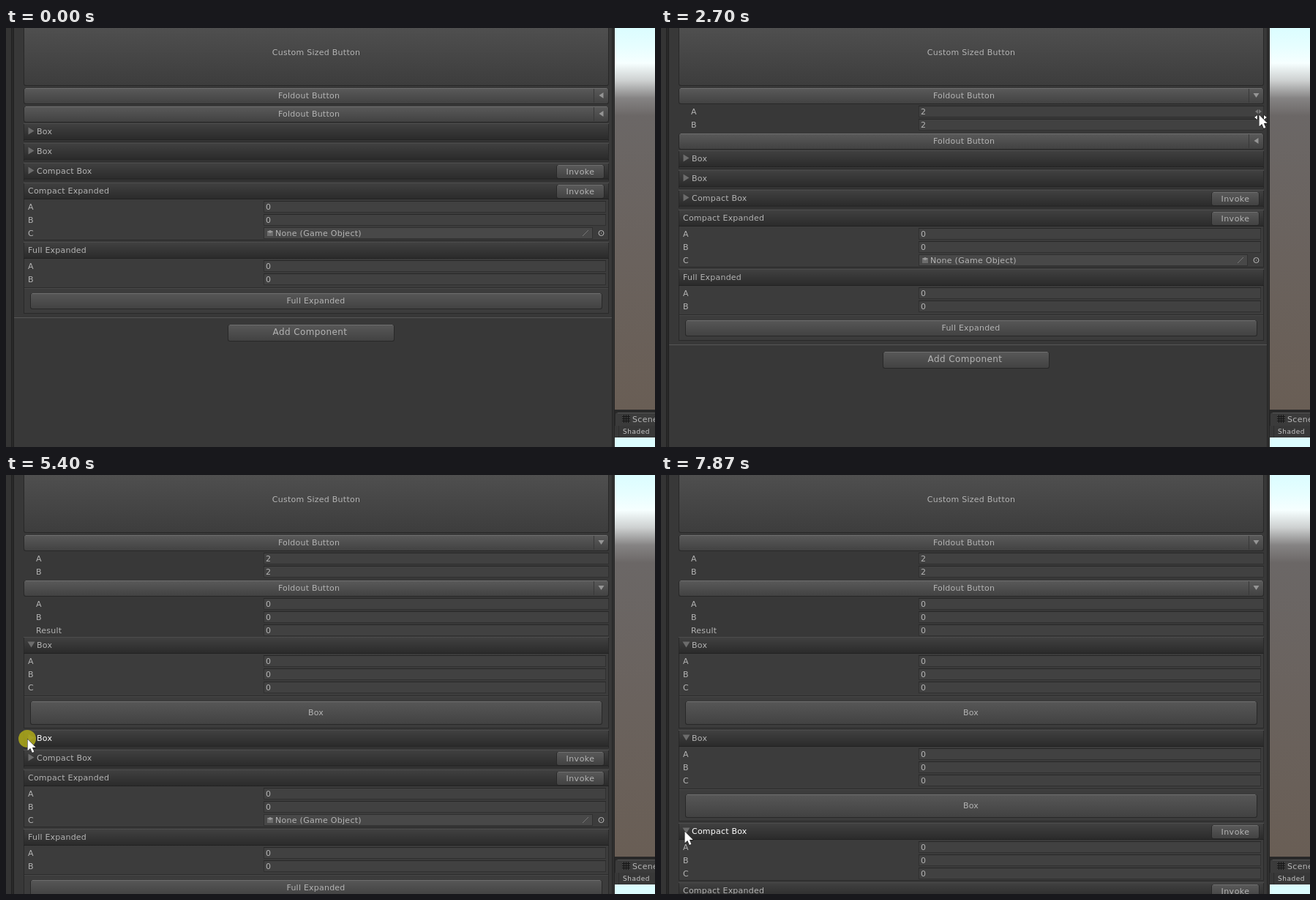
These frames come from a looping animation (887x572 px, 8 s). An HTML page with a canvas:

```html
<!DOCTYPE html>
<html lang="en">
<head>
<meta charset="utf-8">
<title>Inspector foldouts</title>
<style>
html, body { margin: 0; width: 100%; height: 100%; overflow: hidden; background: #383838; }
canvas { display: block; }
</style>
</head>
<body>
<canvas id="stage" width="887" height="572"></canvas>
<script>
const ctx = document.getElementById('stage').getContext('2d');
const LOOP = 8000;
const START = 210;
const STEP = 77.37; // the screen refreshes at this interval
const CLICK = 75;
const TEXT = '#b4b4b4';

// Places the pointer visits; it may click there and open a section.
const stops = [
  { arrive: START, x: 820, y: 532 },
  { arrive: 980, x: 650, y: 96, click: 980, leave: 1135 },
  { arrive: 1370, x: 648, y: 123, click: 1520, leave: 1595 },
  { arrive: 2240, x: 812, y: 93, click: 2290, leave: 2450, opens: 'foldout1' },
  { arrive: 2680, x: 817, y: 118, leave: 2740 },
  { arrive: 3010, x: 815, y: 155, click: 3220, leave: 3400, opens: 'foldout2' },
  { arrive: 4460, x: 29, y: 233, click: 4540, leave: 4780, opens: 'box1' },
  { arrive: 5165, x: 60, y: 325, click: 5235, leave: 5310 },
  { arrive: 5390, x: 29, y: 360, click: 5390, leave: 5560, opens: 'box2' },
  { arrive: 6090, x: 180, y: 396 },
  { arrive: 6470, x: 164, y: 459, click: 6625, leave: 6705 },
  { arrive: 7170, x: 18, y: 490, leave: 7380 },
  { arrive: 7470, x: 32, y: 486, click: 7630, opens: 'compact' }
];

let now, pointer, down;

function pointerAt(t) {
  const i = stops.findLastIndex(s => s.arrive <= t);
  if (i < 0) return { x: -99, y: -99 };
  const from = stops[i], to = stops[i + 1] || from;
  const leave = from.leave ?? from.arrive;
  let k = Math.max(0, (t - leave) / (to.arrive - leave));
  k = to === from ? 0 : k * k * (3 - 2 * k);
  return {
    x: Math.round(from.x + (to.x - from.x) * k),
    y: Math.round(from.y + (to.y - from.y) * k)
  };
}

const isOpen = name => now >= stops.find(s => s.opens === name).click + CLICK;
const over = (x, y, w, h) =>
  pointer.x >= x && pointer.x < x + w && pointer.y >= y && pointer.y < y + h;

function rect(x, y, w, h, fill) {
  ctx.fillStyle = fill;
  ctx.fillRect(x, y, w, h);
}

function rounded(x, y, w, h, r, fill) {
  ctx.beginPath();
  ctx.roundRect(x, y, w, h, r);
  ctx.fillStyle = fill;
  ctx.fill();
}

function shade(y0, y1, ...colors) {
  const g = ctx.createLinearGradient(0, y0, 0, y1);
  colors.forEach((c, i) => g.addColorStop(i / (colors.length - 1), c));
  return g;
}

function label(text, x, y, { color = TEXT, size = 11, align = 'left', spacing = 0.22 } = {}) {
  ctx.font = `${size}px "DejaVu Sans", sans-serif`;
  ctx.letterSpacing = spacing + 'px';
  ctx.textAlign = align;
  ctx.fillStyle = color;
  ctx.fillText(text, x, y + 4);
}

function polygon(points, fill, stroke) {
  ctx.beginPath();
  points.forEach(([x, y]) => ctx.lineTo(x, y));
  ctx.closePath();
  if (stroke) {
    ctx.strokeStyle = stroke;
    ctx.lineWidth = 1;
    ctx.stroke();
  }
  ctx.fillStyle = fill;
  ctx.fill();
}

function triangle(x, y, dir, color, r = 4, stroke) {
  const turn = { right: 0, down: Math.PI / 2, left: Math.PI }[dir];
  const c = Math.cos(turn), s = Math.sin(turn);
  const points = [[-r, -r - 1], [r, 0], [-r, r + 1]];
  polygon(points.map(([a, b]) => [x + a * c - b * s, y + a * s + b * c]), color, stroke);
}

function button(x, y, w, h, top = '#5a5a5a', bottom = '#424242') {
  const pressed = down && over(x, y, w, h);
  rounded(x, y, w, h + 1, 3, '#282828');
  rounded(x + 1, y, w - 2, h, 2.5,
    pressed ? shade(y, y + h, '#303030', '#3e3e3e') : shade(y, y + h, top, bottom));
  if (!pressed) rect(x + 3, y, w - 6, 1, '#6e6e6e');
}

function foldout(y, name) {
  button(24, y, 800, 21);
  rect(803, y + 1, 1, 19, '#383838');
  label('Foldout Button', 414, y + 10, { align: 'center' });
  triangle(813.5, y + 10, isOpen(name) ? 'down' : 'left', '#959595', 3);
}

function row(name, value, y, x = 30, right = 820) {
  label(name, x, y);
  rect(352, y - 8, right - 352, 16, '#303030');
  rect(352, y - 8, right - 352, 1, '#282828');
  rect(353, y - 7, right - 354, 14, '#414141');
  label(value, 355, y);
  if (over(24, y - 9, 800, 18)) {
    triangle(right - 10, y, 'left', '#777', 2);
    triangle(right - 5, y, 'right', '#777', 2);
  }
}

function numberRows(names, y, x, right) {
  [...names].forEach((name, i) => row(name, '0', y + i * 18, x, right));
}

function objectRow(y) {
  label('C', 30, y);
  rect(352, y - 8, 450, 16, '#303030');
  rect(353, y - 7, 448, 14, '#484848');
  rect(357, y - 3, 8, 7, '#6c6c6c');
  polygon([[357, y - 2], [361, y - 4], [365, y - 2], [361, y]], '#999');
  label('None (Game Object)', 368, y, { spacing: 0.28 });
  ctx.strokeStyle = '#777';
  ctx.lineWidth = 1;
  ctx.beginPath();
  ctx.moveTo(788, y + 4);
  ctx.lineTo(796, y - 4);
  ctx.stroke();
  ctx.strokeStyle = '#bbb';
  ctx.beginPath();
  ctx.arc(813.5, y, 3.5, 0, 7);
  ctx.stroke();
  rect(813, y - 0.5, 1, 1, '#ccc');
}

function header(title, y, height, { open, invoke, foldable = true }) {
  rect(24, y - 11, 800, height, '#292929');
  rect(25, y - 10, 798, height - 2, '#3c3c3c');
  rect(24, y - 11, 800, 1, '#4c4c4c');
  rect(25, y - 10, 798, 21, shade(y - 10, y + 11, '#404040', '#2b2b2b'));
  rect(24, y + 11, 800, 1, '#222');
  const hover = foldable && over(24, y - 10, 800, 23);
  if (foldable) triangle(34.5, y - 0.5, open ? 'down' : 'right', '#6c6c6c');
  label(title, foldable ? 42 : 30, y, { color: hover ? '#fff' : TEXT });
  if (invoke) {
    button(752, y - 8, 66, 18);
    label('Invoke', 785, y + 1, { align: 'center', spacing: 0.5 });
  }
}

function footerButton(title, y, h) {
  rect(25, y - 8, 798, 1, '#2c2c2c');
  rect(25, y - 7, 798, 1, '#484848');
  button(33, y, 782, h, '#575757');
  label(title, 423.5, y + Math.floor(h / 2), { align: 'center' });
}

function box(name, y) {
  const open = isOpen(name);
  header('Box', y, open ? 125 : 25, { open });
  if (!open) return y + 27;
  numberRows('ABC', y + 22);
  footerButton('Box', y + 77, 31);
  return y + 127;
}

function drawInspector() {
  rect(0, 0, 887, 572, '#383838');
  rect(0, 0, 7, 572, '#343434');
  rect(7, 0, 4, 572, '#202020');
  rect(8, 0, 2, 572, '#292929');

  button(24, -50, 800, 128, '#5a5a5a', '#3d3d3d');
  label('Custom Sized Button', 424, 33, { align: 'center', spacing: 0.25 });

  foldout(82, 'foldout1');
  let y = 107;
  if (isOpen('foldout1')) {
    row('A', '2', 114, 41, 824);
    row('B', '2', 132, 41, 824);
    y += 37;
  }
  foldout(y, 'foldout2');
  if (isOpen('foldout2')) {
    numberRows(['A', 'B', 'Result'], y + 32, 41, 824);
    y += 54;
  }
  y = box('box1', y + 34);
  y = box('box2', y);

  const open = isOpen('compact');
  header('Compact Box', y, open ? 79 : 25, { open, invoke: true });
  if (open) numberRows('ABC', y + 22);
  y += open ? 81 : 27;

  header('Compact Expanded', y, 79, { invoke: true, foldable: false });
  numberRows('AB', y + 22);
  objectRow(y + 58);
  y += 81;

  header('Full Expanded', y, 98, { foldable: false });
  numberRows('AB', y + 22);
  footerButton('Full Expanded', y + 59, 21);

  rect(11, y + 92, 818, 1, '#555');
  button(303, y + 102, 228, 22, '#585858');
  label('Add Component', 415.5, y + 112, { align: 'center', size: 12, spacing: 0.4 });
}

function drawScene() {
  rect(828, 0, 4, 572, '#252525');
  rect(829, 0, 2, 572, '#303030');
  rect(832, 0, 55, 120, shade(0, 120, '#dbfdff', '#e6feff', '#f6ffff', '#cdd0d0', '#858383', '#6b6766'));
  rect(832, 120, 55, 401, shade(120, 521, '#6b6766', '#6a625d', '#695e55'));
  rect(832, 521, 55, 51, '#282828');
  rounded(833, 525, 70, 30, 3, '#3b3b3b');
  rect(836, 525, 51, 1, '#555');
  for (let i = 0; i < 3; i++) {
    rect(844 + i * 3, 528, 1, 11, '#161616');
    rect(842, 530 + i * 3, 11, 1, '#161616');
  }
  label('Scene', 856, 534, { spacing: 0.3 });
  rect(832, 543, 55, 16, '#383838');
  rect(837, 543, 1, 16, '#2d2d2d');
  label('Shaded', 843, 550, { size: 9, spacing: 0.5, color: '#c8c8c8' });
  rect(832, 559, 55, 13, '#dcfdff');
}

function drawPointer() {
  const { x, y } = pointer;
  if (down) {
    ctx.beginPath();
    ctx.arc(x, y, 12, 0, 7);
    ctx.fillStyle = 'rgba(176, 172, 24, 0.84)';
    ctx.fill();
  }
  if (isOpen('foldout1') && over(804, 105, 20, 36)) {
    triangle(x - 4, y + 4, 'left', '#fff', 2, '#000');
    triangle(x + 9, y + 4, 'right', '#fff', 2, '#000');
  }
  const arrow = [[0, 0], [0, 16], [3.7, 12.6], [6.3, 18.6], [9, 17.4], [6.5, 11.6], [11.3, 11.6]];
  polygon(arrow.map(([a, b]) => [x + a + 0.5, y + b + 0.5]), '#fff', '#000');
}

function frame() {
  const t = performance.now() % LOOP;
  now = START + Math.floor((t - START) / STEP) * STEP;
  pointer = pointerAt(now);
  down = stops.some(s => now >= s.click && now < s.click + CLICK);
  drawInspector();
  drawScene();
  drawPointer();
  requestAnimationFrame(frame);
}
frame();
</script>
</body>
</html>
```
